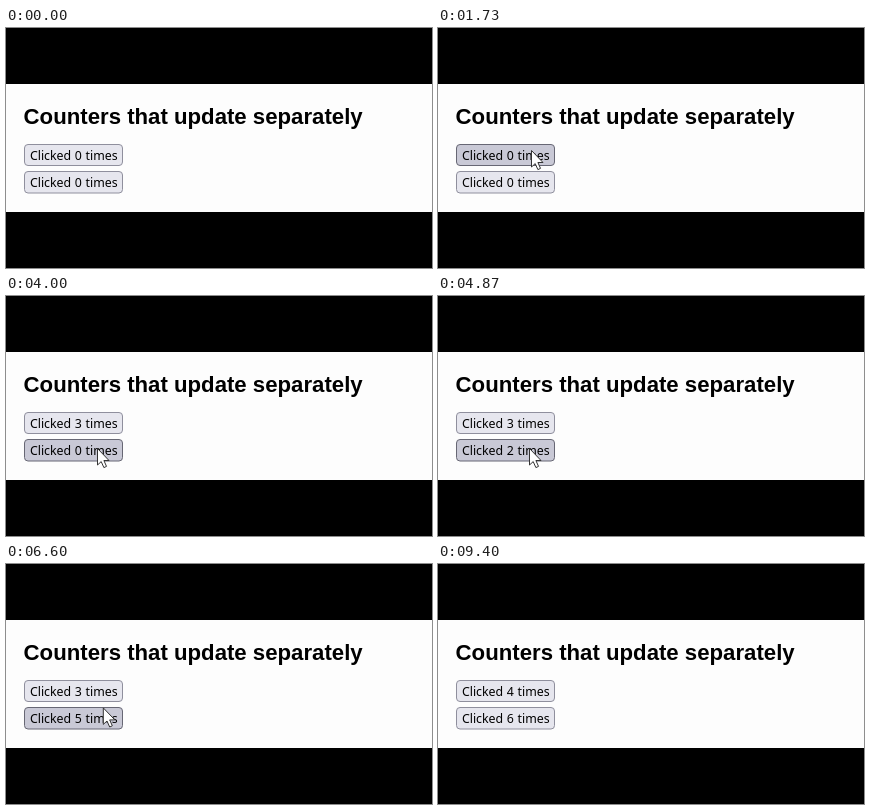
Recreate the animation shown at these times as an HTML page. Size 426 by 240 pixels, loop 9470 ms.

```html
<!DOCTYPE html>
<html lang="en">
<head>
<meta charset="utf-8">
<title>Counters</title>
<style>
  html, body { margin: 0; height: 100%; overflow: hidden; background: #000; }
  svg { display: block; width: 100%; height: 100%; }
  .title { font: bold 22.2px "Liberation Sans", Arial, sans-serif; }
  .button text { font: 12.37px "Noto Sans", sans-serif; word-spacing: .4px; }
  .button rect { fill: #e6e6ee; stroke: #8f8f9d; }
  .button.hover rect { fill: #c9c9d6; stroke: #676774; }
  .button.active rect { fill: #b1b1b9; stroke: #484851; }
</style>
</head>
<body>
<svg viewBox="0 0 426 240">
  <clipPath id="page"><rect y="56" width="426" height="128"/></clipPath>
  <g clip-path="url(#page)">
    <rect y="56" width="426" height="128" fill="#fdfdfd"/>
    <text class="title" x="17.6" y="95.7">Counters that update separately</text>
    <g class="button" transform="translate(18 116)">
      <rect x=".5" y=".5" width="98" height="21" rx="3.5"/>
      <text x="5.9" y="16"></text>
    </g>
    <g class="button" transform="translate(18 143)">
      <rect x=".5" y=".5" width="98" height="21.5" rx="3.5"/>
      <text x="5.9" y="16"></text>
    </g>
    <path id="cursor" d="M.5 .5V17L4.2 13.6 6.9 19.6 9.5 18.4 6.9 12.5H12Z" fill="#fff" stroke="#333"/>
  </g>
</svg>
<script>
  const LOOP = 9470, STEP = LOOP / 142, PRESS = 110;

  // The pointer rests at each place in turn, clicking at even intervals
  const home = { x: 436, y: 186, clicks: 0 };
  const visits = [
    { ...home, arrive: 0, leave: 800 },
    { x: 93, y: 122, arrive: 1600, leave: 3250, button: 0, clicks: 3 },
    { x: 91, y: 152, arrive: 3700, leave: 6400, button: 1, clicks: 5 },
    { x: 110, y: 124, arrive: 6950, leave: 7100, button: 0, clicks: 1 },
    { x: 100, y: 155, arrive: 7400, leave: 7600, button: 1, clicks: 1 },
    { ...home, arrive: 8900, leave: LOOP }
  ];

  const clickTimes = ({ arrive, leave, clicks }) =>
    Array.from({ length: clicks }, (_, i) => arrive + (leave - arrive) * (i + 1) / (clicks + 1));

  const buttons = [...document.querySelectorAll(".button")].map((node, i) => ({
    node,
    label: node.querySelector("text"),
    top: 116 + 27 * i,
    clicks: visits.filter(visit => visit.button === i).flatMap(clickTimes)
  }));
  const cursor = document.getElementById("cursor");

  function pointerAt(t) {
    const i = visits.findLastIndex(visit => visit.arrive <= t);
    const from = visits[i], to = visits[i + 1] || from;
    const u = Math.max(0, (t - from.leave) / (to.arrive - from.leave));
    const ease = u * u * (3 - 2 * u);
    return [from.x + (to.x - from.x) * ease, from.y + (to.y - from.y) * ease];
  }

  function draw(now) {
    const t = Math.round(now % LOOP / STEP) * STEP % LOOP;
    const [x, y] = pointerAt(t);
    cursor.setAttribute("transform", `translate(${x.toFixed(1)} ${y.toFixed(1)})`);
    for (const { node, label, top, clicks } of buttons) {
      const count = clicks.filter(time => time <= t).length;
      label.textContent = `Clicked ${count} times`;
      node.classList.toggle("hover", x >= 18 && x <= 117 && y >= top && y <= top + 22);
      node.classList.toggle("active", clicks.some(time => t < time && t > time - PRESS));
    }
    requestAnimationFrame(draw);
  }
  draw(0);
</script>
</body>
</html>
```
